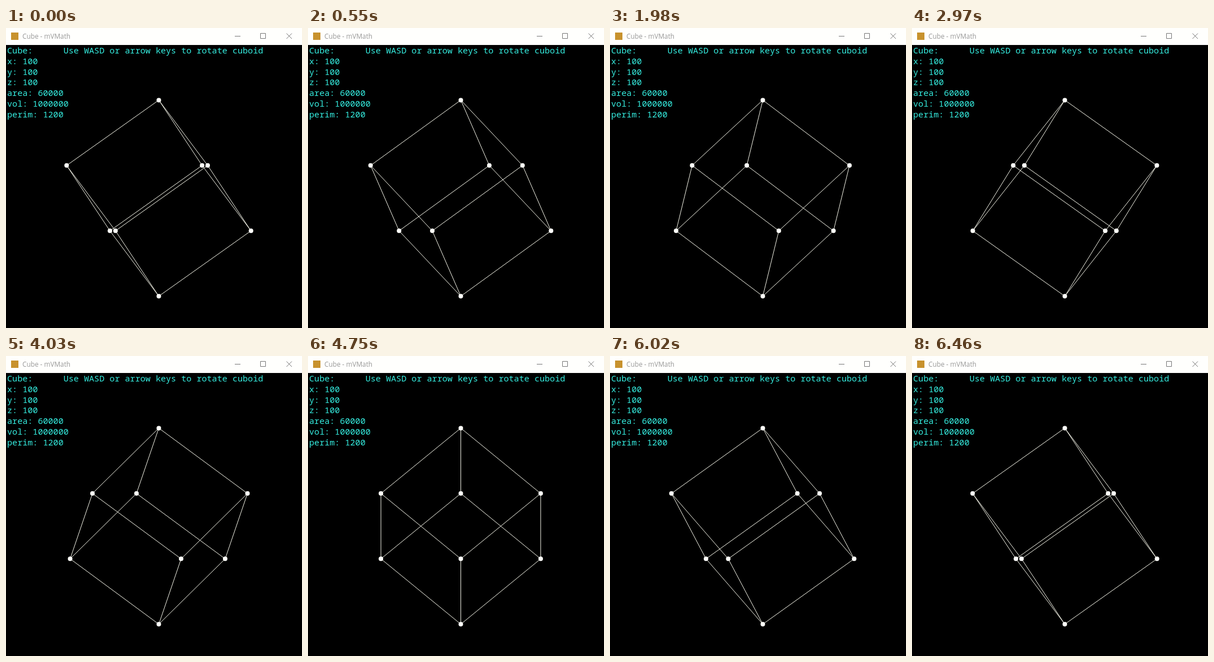
An HTML page for the animation above (6490 ms loop, 524 px wide and 530 px high).

```html
<!DOCTYPE html>
<html lang="en">
<head>
<meta charset="utf-8">
<title>Cube - mVMath</title>
<style>
  html, body { margin: 0; width: 100%; height: 100%; overflow: hidden; background: #000; }
  svg { display: block; width: 524px; height: 530px; }
  .title { font: 11.8px "Open Sans", "Noto Sans", sans-serif; fill: #999; }
  .buttons { fill: none; stroke: #777; }
  .info text { font: 500 15.12px "Noto Sans Mono", "DejaVu Sans Mono", monospace; fill: #35ecdf; white-space: pre; }
  #edges { fill: none; stroke: #f4f4e8; }
  #dots { fill: #fffffa; }
</style>
</head>
<body>
<svg viewBox="0 0 524 530">
  <rect width="524" height="530"/>
  <rect width="524" height="30" fill="#fffffd"/>
  <rect x="9" y="8" width="13" height="13" fill="#c8922e"/>
  <text class="title" x="29" y="19">Cube - mVMath</text>
  <g class="buttons">
    <path d="M405 14.5h10M450.5 9.5h9v9h-9z"/>
    <path d="M496.5 9.5l9.5 9.5m0-9.5l-9.5 9.5"/>
  </g>
  <g id="info" class="info"></g>
  <path id="edges"/>
  <g id="dots"></g>
</svg>
<script>
const SVG = "http://www.w3.org/2000/svg";
const LOOP = 6490, TICK = 108.2, STEP = 2, START = 58;
const CX = 270.5, CY = 300.6, SIDE = 200;
const HALF = SIDE * Math.sqrt(3) / 2;     // half of the space diagonal
const RING = SIDE * Math.sqrt(2 / 3);     // radius of the rings between the tips

function add(parent, tag, attrs) {
  const node = document.createElementNS(SVG, tag);
  for (const key in attrs) node.setAttribute(key, attrs[key]);
  return document.getElementById(parent).appendChild(node);
}

const lines = [
  "Cube:      Use WASD or arrow keys to rotate cuboid",
  "x: 100", "y: 100", "z: 100",
  "area: 60000", "vol: 1000000", "perim: 1200"
];
lines.forEach((line, i) => {
  add("info", "text", { x: 2, y: 45.2 + 18.75 * i }).textContent = line;
});

const dots = Array.from({ length: 8 }, () => add("dots", "circle", { r: 4 }));
const edges = document.getElementById("edges");

// The cube stands on one corner and turns in steps about its upright diagonal.
function angleAt(t) {
  const lag = t < 2500 ? 0 : 45;
  const steps = 1 + Math.floor((t - 30 - lag) / TICK);
  return START - STEP * steps;
}

function ringPoint(deg, y) {
  return [CX + RING * Math.cos(deg * Math.PI / 180), y];
}

function draw(t) {
  const angle = angleAt(t);
  const top = [CX, CY - HALF], bottom = [CX, CY + HALF];
  const upper = [0, 120, 240].map(a => ringPoint(angle + a, CY - HALF / 3));
  const lower = [60, 180, 300].map(a => ringPoint(angle + a, CY + HALF / 3));

  let d = "";
  const join = (a, b) => { d += `M${a}L${b}`; };
  for (let i = 0; i < 3; i++) {
    join(top, upper[i]);
    join(upper[i], lower[i]);
    join(upper[i], lower[(i + 2) % 3]);
    join(lower[i], bottom);
  }
  edges.setAttribute("d", d);

  [top, ...upper, ...lower, bottom].forEach(([x, y], i) => {
    dots[i].setAttribute("cx", x);
    dots[i].setAttribute("cy", y);
  });
}

const begin = performance.now();
function frame() {
  draw((performance.now() - begin) % LOOP);
  requestAnimationFrame(frame);
}
frame();
</script>
</body>
</html>
```
